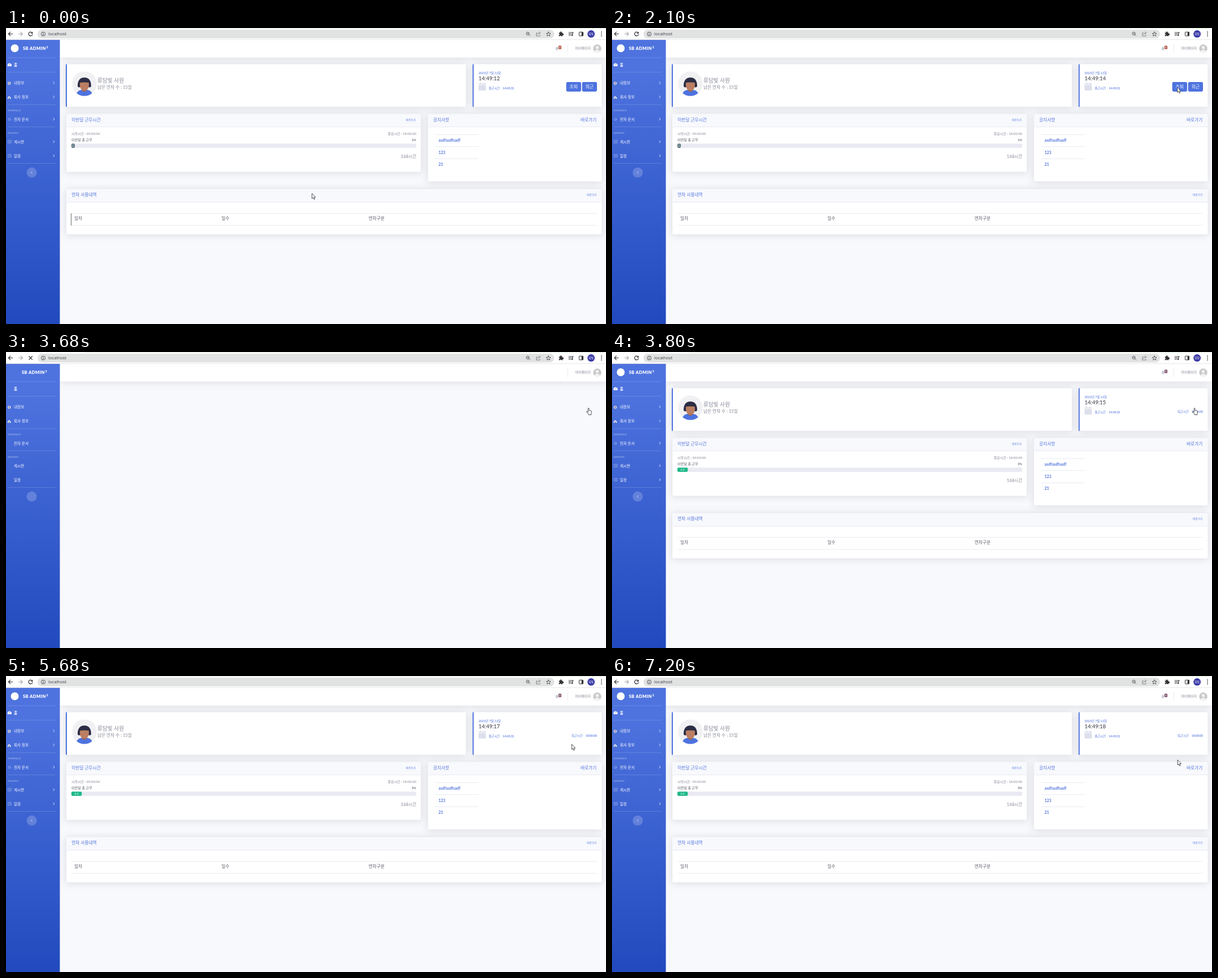
Write an HTML page that moves like this. It is 1064 px wide and 526 px high and loops after 7600 ms.

```html
<!DOCTYPE html>
<html lang="ko">
<head>
<meta charset="utf-8">
<style>
html, body { margin: 0; width: 100%; height: 100%; overflow: hidden; background: #f8f9fc; }
svg { display: block; width: 1064px; height: 526px; }
text { font-family: Lato, "Noto Sans CJK KR", "Noto Sans CJK", sans-serif; white-space: pre; }
.chrome text { font-family: "Open Sans", "Noto Sans CJK KR", "Noto Sans CJK", sans-serif; }
.card { filter: drop-shadow(0 1.2px 6.7px rgba(58, 59, 69, .15)); }
.line { fill: none; stroke-linecap: round; stroke-linejoin: round; }
</style>
</head>
<body>
<svg id="stage" viewBox="0 0 1064 526">
  <defs>
    <linearGradient id="side" x2="0" y2="1">
      <stop offset=".1" stop-color="#4e73df"/><stop offset="1" stop-color="#224abe"/>
    </linearGradient>
    <clipPath id="face"><circle cx="139" cy="99" r="21.8"/></clipPath>
    <clipPath id="user"><circle cx="1048.5" cy="36.5" r="7.2"/></clipPath>
  </defs>
</svg>
<script>
const LOOP = 7600;
const BLUE = '#4e73df', GREY = '#858796', DARK = '#5a5c69', EDGE = '#e3e6f0', INK = '#303236', HAIR = '#2c2d45';
const stage = document.getElementById('stage');

const text = (x, y, size, str, fill = GREY, weight = 400, anchor = 'start', extra = '') =>
  `<text x="${x}" y="${y}" font-size="${size}" fill="${fill}" font-weight="${weight}" text-anchor="${anchor}" ${extra}>${str}</text>`;
const rect = (x, y, w, h, fill, r = 0, extra = '') =>
  `<rect x="${x}" y="${y}" width="${w}" height="${h}" fill="${fill}" rx="${r}" ${extra}/>`;
const circle = (x, y, r, fill, extra = '') => `<circle cx="${x}" cy="${y}" r="${r}" fill="${fill}" ${extra}/>`;
const path = (d, fill, extra = '') => `<path d="${d}" fill="${fill}" ${extra}/>`;
const stroke = (d, color, width = 1, extra = '') =>
  `<path class="line" d="${d}" stroke="${color}" stroke-width="${width}" ${extra}/>`;
const group = (id, body, extra = '') => `<g id="${id}" ${extra}>${body}</g>`;
const hline = (x1, x2, y, color = EDGE) => rect(x1, y, x2 - x1, 0.8, color);

function card(x, y, w, h, title, link, linkSize) {
  let s = `<g class="card">${rect(x, y, w, h, '#fff', 2.2, `stroke="${EDGE}" stroke-width=".6"`)}</g>`;
  if (!title) return s + path(`M${x + 2} ${y}v${h}q-2 0-2-2v${4 - h}q0-2 2-2z`, BLUE);
  const edge = x + w - 9.5;
  return s + rect(x + .4, y + .4, w - .8, 22.6, '#f8f9fc', 2) + hline(x, x + w, y + 23) +
    text(x + 9.5, y + 13.3, 7.7, title, BLUE, 500) +
    text(edge, y + (linkSize > 6 ? 13.3 : 12.4), linkSize, link, BLUE, 400, 'end');
}

function toolbar() {
  return rect(0, 0, 1064, 21, '#fff') + rect(137, 0, 927, .8, '#d6ecd0') + rect(0, 20.4, 1064, .7, '#dcdde0') +
    rect(56, 3, 916, 15.4, '#e1e2e2', 7.7) +
    stroke('M11.5 10.5H4.6M7.7 7.2L4.4 10.5L7.7 13.8', INK, 1.2) +
    stroke('M22.4 10.5H29.3M26.2 7.2L29.5 10.5L26.2 13.8', '#a3a5a8', 1.1) +
    group('reload', stroke('M46.3 8.4A3.5 3.5 0 1 0 46.9 11.5', INK, 1.2) + path('M47.4 6.5V10H43.9Z', INK)) +
    group('stop', stroke('M40.8 7.8L46.4 13.4M46.4 7.8L40.8 13.4', INK, 1.3)) +
    circle(66, 10.7, 3.5, 'none', `stroke="${INK}" stroke-width=".8"`) + stroke('M66 10.4V12.5M66 8.8V8.9', INK, .9) +
    text(75, 13.4, 7.7, 'localhost', '#3a3c40') +
    circle(925.3, 9.9, 2.6, 'none', 'stroke="#55585c"') + stroke('M927.3 11.9L929.4 14M924.2 9.9H926.4', '#55585c', .9) +
    stroke('M942.6 8.8H940.5V14.2H946.8V12.6M942.4 11.7Q943 8.7 947.2 8.6M945.3 6.7L947.4 8.6L945.3 10.6', '#7a7d82', .9) +
    stroke('M962 6.9L963.1 9.4L965.9 9.6L963.8 11.5L964.4 14.2L962 12.8L959.6 14.2L960.2 11.5L958.1 9.6L960.9 9.4Z', '#4a4d52', .9) +
    path('M980.5 8.2H982.7A1.4 1.4 0 1 1 985.2 8.2H987V10A1.4 1.4 0 1 1 987 12.6V14.4H984.8A1.2 1.2 0 0 0 982.5 14.4H980.5V12.4A1.2 1.2 0 0 0 980.5 10Z', INK) +
    stroke('M998 8H1004.5M998 10.5H1003M998 13H1001.3M1004.7 13V8H1006.3', INK, 1.1) + circle(1003.8, 13, 1.2, INK) +
    rect(1016.4, 7.2, 7, 6.8, 'none', .6, `stroke="${INK}" stroke-width="1"`) + rect(1020.6, 7.2, 2.8, 6.8, INK) +
    circle(1037.6, 10.6, 6.5, '#3a3ba6') + text(1037.6, 12.4, 4.8, '담빛', '#fff', 400, 'middle') +
    [7.3, 10.7, 14.1].map(y => circle(1056, y, .95, INK)).join('');
}

function sidebar() {
  const white = 'rgba(255,255,255,.85)', dim = 'rgba(255,255,255,.4)';
  const items = [[97.5, '내정보'], [122.5, '회사 정보'], [162, '전자 문서'], [202, '게시판'], [227, '일정']];
  let s = rect(0, 21, 95.5, 505, 'url(#side)');
  s += [52.4, 78, 135.7, 175.3, 240].map(y => hline(3, 88, y, 'rgba(255,255,255,.2)')).join('');
  s += group('brand', text(30, 38.5, 7.6, 'SB ADMIN', '#fff', 900, 'start', 'letter-spacing=".4"') +
    text(71.4, 35.8, 5.4, '2', '#fff', 900));
  s += text(14, 67.9, 6.6, '홈', '#fff', 700);
  s += items.map(([y, label]) => text(14, y + 2.5, 6.6, label, '#fff')).join('');
  s += text(2.8, 147.8, 4.4, 'INTERFACE', dim, 800) + text(2.8, 187.5, 4.4, 'ADDONS', dim, 800);
  s += circle(5.8, 98.3, 2.8, '#cfd6ee') + circle(5.8, 97.5, 1, '#7c6e86') + path('M3.9 100.1Q5.8 97.6 7.7 100.1Z', '#7c6e86');
  s += path('M2.8 126V123.4L5.6 120.8L8.6 123.4V126Z', '#d9def0') + rect(4.8, 123.8, 1.7, 2.2, '#66719e');
  s += circle(45.6, 256.8, 9, 'rgba(255,255,255,.2)');
  const icons = circle(15.5, 36, 7, '#fff') +
    path('M2.8 67.4A3.7 3.7 0 1 1 9.8 67.4Q9.5 68 8.8 68H3.8Q3.1 68 2.8 67.4Z', '#fff') +
    stroke('M6.2 66.4L7.4 63.8', BLUE, .8) +
    items.map(([y]) => stroke(`M84 ${y - 1.8}L85.9 ${y}L84 ${y + 1.8}`, white, 1)).join('') +
    circle(6.2, 162.2, 1.9, 'none', 'stroke="rgba(255,255,255,.4)" stroke-width="1.5" stroke-dasharray="1 .5"') +
    [202, 227].map(y => rect(3.3, y - 2.5, 6.2, 5, 'none', .6, `stroke="${dim}" stroke-width=".8"`) +
      stroke(`M5 ${y - .8}H8M5 ${y + .9}H8`, dim, .7)).join('') +
    stroke('M46.3 254.9L44.4 256.8L46.3 258.7', 'rgba(255,255,255,.6)', 1);
  return s + group('sideIcons', icons);
}

function topbar() {
  return `<g class="card">${rect(95.5, 21, 969, 31.5, '#fff')}</g>` + rect(995.6, 28, .8, 17, EDGE) +
    text(1037.2, 38.2, 6.1, '마이페이지', GREY, 400, 'end') +
    circle(1048.5, 36.5, 7.2, '#c9c9ca') +
    `<g clip-path="url(#user)">${circle(1048.5, 34.8, 2.7, '#f2f2f2')}${circle(1048.5, 43.4, 5, '#f2f2f2')}</g>` +
    group('bell', path('M974 38.2Q975 37.4 975 35.8Q975.2 33.6 977 33.2Q978.8 33.6 979 35.8Q979 37.4 980 38.2Z', '#c4c6d4') +
      circle(977, 39, .9, '#c4c6d4') + rect(979.7, 31.6, 5.2, 6, '#b4533f', 1.3, 'id="badge"') +
      text(982.3, 36.3, 4.4, '0', '#fff', 700, 'middle'));
}

function portrait() {
  return circle(139, 99, 21.8, '#f1f1f3') + `<g clip-path="url(#face)">` +
    path('M127 103.5Q127 88 139 88Q151 88 151 103.5Q149.5 106.5 147 105H131Q128.5 106.5 127 103.5Z', HAIR) +
    path('M123.5 122Q125 111 133.5 110H144.5Q153 111 154.5 122Z', BLUE) +
    path('M134.5 106H143.5V111Q139 115.5 134.5 111Z', '#a0684f') +
    path('M131 95.5H147V102.5Q146.3 111 139 111Q131.7 111 131 102.5Z', '#ba7e62') +
    path('M129.6 97.5Q130 90 139 89.8Q148 90 148.4 97.5Q139 95.5 129.6 97.5Z', HAIR) + '</g>';
}

function button(x, label, id) {
  return rect(x, 96, 26.4, 17, BLUE, 2.4, `id="${id}"`) + text(x + 13.2, 106.8, 7.7, label, '#fff', 400, 'middle');
}

function content() {
  const rows = [[202.3, 'asdfasdfsadf'], [223.9, '123'], [245.3, '21']];
  return card(106, 64, 710, 76.5) + portrait() +
    text(162, 96.8, 9.7, '류담빛 사원') + text(162, 108, 7.7, '남은 연차 수 : 15일') +
    card(827.4, 64, 229.4, 76.5) +
    text(838, 81.6, 5.4, '2023년 7월 12일', BLUE, 500) + text(838, 93.4, 9.5, '', '#43444f', 500, 'start', 'id="clock"') +
    path('M838 100.6V99.8Q838 98.6 839.2 98.6H840.4V97H842V98.6H847V97H848.6V98.6H849.8Q851 98.6 851 99.8V100.6ZM838 101.5H851V109.8Q851 111 849.8 111H839.2Q838 111 838 109.8Z', '#dddfeb') +
    text(856, 109, 5.3, '출근시간', BLUE, 500) + text(881, 109, 5.1, '14:45:31', BLUE, 600) +
    group('buttons', rect(1020.4, 94.7, 29, 19.6, 'rgba(78,115,223,.5)', 3.6, 'id="focus"') +
      button(993.5, '조퇴', 'early') + button(1021.6, '외근', 'field')) +
    group('leave', text(1003, 108.4, 5.3, '퇴근시간', BLUE, 500) + text(1048, 108.4, 5.1, '18:00:00', BLUE, 600, 'end')) +
    card(106.8, 152.4, 629.2, 103.6, '이번달 근무시간', '바로가기', 4.7) +
    text(116, 190, 6, '시작시간 : 09:00:00') + text(727.5, 190, 6, '종료시간 : 18:00:00', GREY, 400, 'end') +
    text(116, 200.5, 6.1, '이번달 총 근무', DARK) + text(727.5, 200.5, 6, '', DARK, 600, 'end', 'id="percent"') +
    rect(116, 205.5, 611.5, 7.4, '#e9eaf2', 2) + rect(116, 205.5, 6, 7.4, '#56707c', 1.8, 'id="bar"') +
    text(119, 211.2, 5.2, '', '#fff', 400, 'middle', 'id="hours"') +
    text(727.5, 230.5, 7.7, '168시간', GREY, 400, 'end') +
    card(748, 152.4, 308.8, 120.6, '공지사항', '바로가기', 7.7) +
    rect(761, 189, 77.4, 22, '#ececec', 0, 'id="hover"') +
    [189, 210.3, 231.9].map(y => hline(761, 838.4, y)).join('') +
    rows.map(([y, label]) => text(767, y, 6.9, label, BLUE, 700)).join('') +
    card(106.8, 286, 950, 81, '연차 사용내역', '바로가기', 4.7) +
    hline(116, 1048, 329) + hline(116, 1048, 350.4) +
    [[121, '일자'], [382, '일수'], [643, '연차구분']].map(([x, label]) => text(x, 341.4, 7.7, label, DARK, 400)).join('') +
    rect(115.2, 329.3, .9, 21.8, '#55565e', 0, 'id="caret"');
}

function pointers() {
  const look = 'stroke="#25262b" stroke-width=".8" stroke-linejoin="round"';
  return group('pointer',
    group('arrow', path('M0 0V9.2L2.1 7.3L3.7 10.7L5.1 10L3.6 6.8H6.4Z', '#fff', look)) +
    group('hand', path('M1.2 8V1.4Q1.2.4 2 .4Q2.9.4 2.9 1.4V4.6L6.6 5.4Q7.6 5.7 7.5 6.8L6.8 10V12.4H2.2V11L-1.6 7.6Q-1.9 6.5-.8 6.4Z', '#fff', look)));
}

stage.insertAdjacentHTML('beforeend',
  rect(0, 0, 1064, 526, '#f8f9fc') + topbar() + sidebar() +
  group('content', content()) + `<g class="chrome">${toolbar()}</g>` + pointers());

const el = id => document.getElementById(id);
const show = (id, on) => el(id).setAttribute('display', on ? 'inline' : 'none');
const set = (id, name, value) => el(id).setAttribute(name, value);
const within = (t, a, b) => t >= a && t < b;

// time, x, y of the pointer tip
const route = [
  [190, 542.6, 294], [260, 542.6, 293.4], [990, 542.6, 293.4], [1250, 670, 238], [1470, 793.7, 185.8],
  [1750, 910, 127], [1900, 965, 112], [2200, 1021, 102], [2450, 1031, 99.2], [4530, 1031, 99.2],
  [4700, 1037, 84], [4930, 1024, 106], [5130, 1003, 119], [5340, 1003, 120], [5510, 1040, 119],
  [5680, 1003, 121.3], [5870, 1040, 122], [6060, 1003, 123], [6260, 1041, 126], [6460, 1004, 129],
  [6660, 1041, 134], [6830, 1029, 138], [7050, 1004, 145], [7200, 1003, 149]
];
// time, last digits of the clock
const ticks = [[0, 12], [1010, 13], [2010, 14], [3010, 15], [4590, 16], [5590, 17], [6590, 18]];

function place(t) {
  const next = route.findIndex(key => key[0] > t);
  if (next < 0) return route[route.length - 1].slice(1);
  if (next === 0) return route[0].slice(1);
  const [t0, x0, y0] = route[next - 1], [t1, x1, y1] = route[next];
  const k = (t - t0) / (t1 - t0);
  return [x0 + (x1 - x0) * k, y0 + (y1 - y0) * k];
}

function render(t) {
  const blank = within(t, 3680, 3730), bare = within(t, 3680, 3800);
  const reloaded = t >= 3730, loading = within(t, 2850, 3800);
  show('content', !blank);
  show('sideIcons', !bare);
  show('bell', !bare);
  set('brand', 'transform', `translate(${bare ? -2 : 0} 0)`);
  show('reload', !loading);
  show('stop', loading);

  show('buttons', !reloaded);
  show('leave', reloaded);
  show('focus', within(t, 2780, 3680));
  set('field', 'fill', t >= 2200 ? '#2e59d9' : BLUE);
  show('hover', within(t, 1400, 1530));
  show('caret', t < 520 || within(t, 1050, 1580) || within(t, 2110, 2710));

  set('bar', 'width', reloaded ? 18.3 : 6);
  set('bar', 'fill', reloaded ? '#1cb887' : '#56707c');
  set('hours', 'x', reloaded ? 125.1 : 119);
  set('badge', 'fill', reloaded ? '#7d4a63' : '#b4533f');
  el('hours').textContent = reloaded ? '6.6' : '2.';
  el('percent').textContent = reloaded ? '3%' : '1%';
  el('clock').textContent = '14:49:' + ticks.filter(tick => tick[0] <= t).pop()[1];

  const hand = within(t, 2200, 4530);
  show('hand', hand);
  show('arrow', !hand);
  set('pointer', 'transform', `translate(${place(t)})`);
}

const start = performance.now();
function frame() {
  render((performance.now() - start) % LOOP);
  requestAnimationFrame(frame);
}
frame();
</script>
</body>
</html>
```
